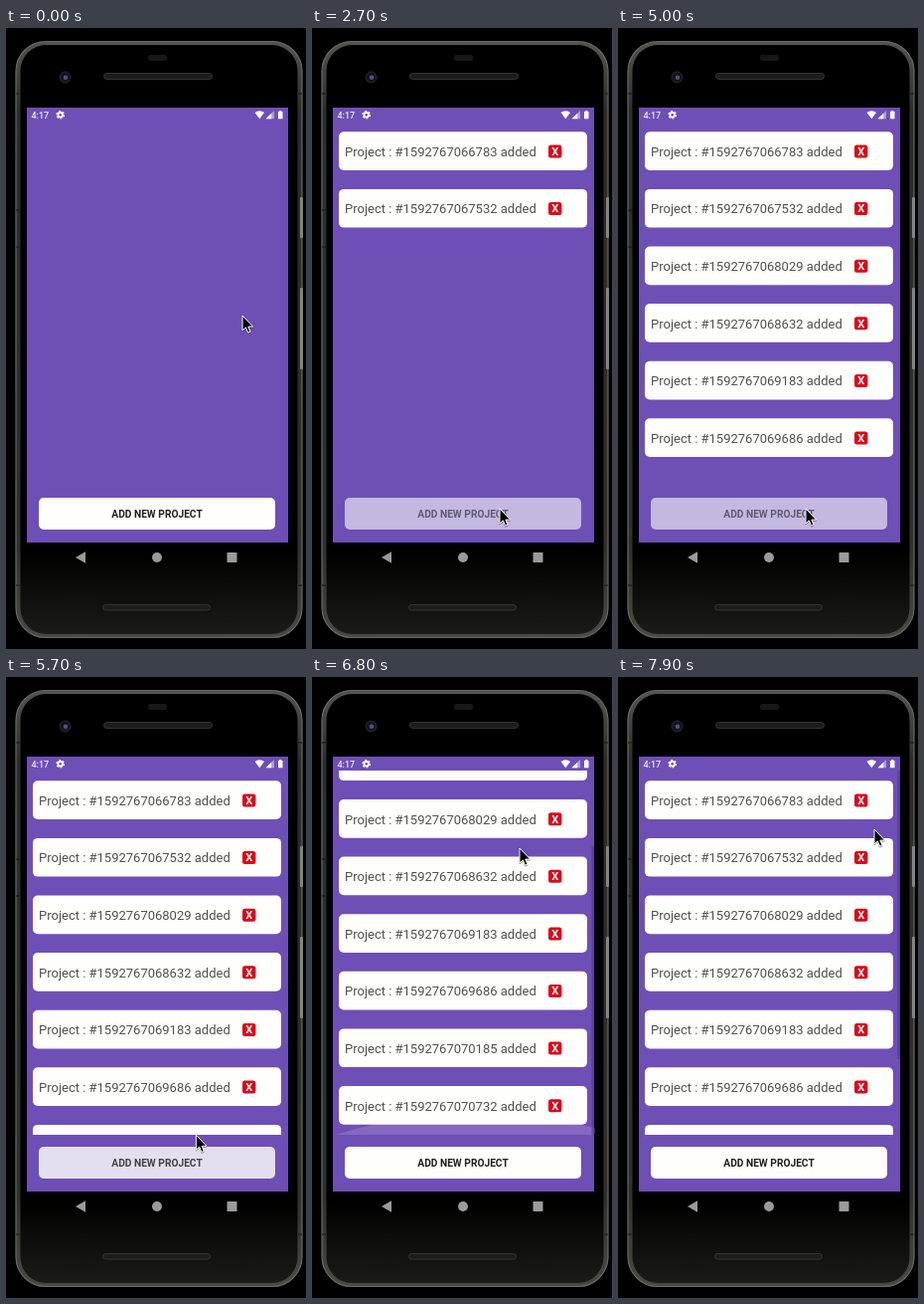
Write an HTML page that moves like this. It is 302x624 px and loops after 8000 ms.

```html
<!DOCTYPE html>
<html lang="en">
<head>
<meta charset="utf-8">
<title>Project list</title>
<style>
  html, body { margin: 0; width: 100%; height: 100%; overflow: hidden; background: #000; }
  svg { display: block; font-family: Roboto, sans-serif; }
  #cursor { filter: drop-shadow(.5px 1px .7px #0006); }
</style>
</head>
<body>
<svg width="302" height="624" viewBox="0 0 302 624">
  <defs>
    <linearGradient id="metal" x2="0" y2="1">
      <stop offset="0" stop-color="#54544f"/>
      <stop offset=".12" stop-color="#2c2c2a"/>
      <stop offset=".85" stop-color="#30302d"/>
      <stop offset="1" stop-color="#4a4a44"/>
    </linearGradient>
    <linearGradient id="glass" x2="0" y2="1">
      <stop offset=".86" stop-color="#000"/>
      <stop offset="1" stop-color="#1b1b17"/>
    </linearGradient>
    <clipPath id="view"><rect x="21" y="94" width="264" height="366"/></clipPath>
  </defs>

  <!-- Phone body -->
  <rect x="10" y="13.5" width="288" height="599" rx="30" fill="url(#metal)" stroke="#696964" stroke-width="1.2"/>
  <rect x="14.5" y="17" width="279" height="592" rx="26" fill="url(#glass)"/>
  <path d="M10 66h4M10 183h4M10 220h4M294 66h4M10 560h4M294 560h4" stroke="#161616"/>
  <g fill="#858580">
    <rect x="296" y="170" width="3" height="41" rx="1"/>
    <rect x="296" y="261" width="3" height="82" rx="1"/>
  </g>
  <rect x="143" y="27" width="19" height="6" rx="2" fill="#171717"/>
  <g fill="#1c1c1c" stroke="#343434">
    <rect x="98.5" y="45.5" width="109" height="6" rx="3"/>
    <rect x="97.5" y="579.5" width="108" height="5.5" rx="2.7"/>
  </g>
  <circle cx="59.5" cy="49.5" r="5.5" fill="#14151b" stroke="#2a2a2e"/>
  <circle cx="60" cy="49.7" r="2.2" fill="#4c5290"/>

  <!-- Screen -->
  <rect x="21" y="80" width="263" height="437" fill="#6e4fb6"/>
  <g fill="#fff">
    <text x="25.5" y="90.7" font-size="9" font-weight="500" fill="#eee9f8">4:17</text>
    <g fill="none" stroke="#fff">
      <circle cx="54.7" cy="87.3" r="2.3" stroke-width="1.8"/>
      <circle cx="54.7" cy="87.3" r="3.7" stroke-width="1.2" stroke-dasharray="1.95 1.925"/>
    </g>
    <path d="M250.5 85Q255.3 81.5 260 85L255.3 91.2Z"/>
    <path d="M261.5 91.2L270 83V91.2Z" opacity=".45"/>
    <path d="M261.5 91.2L267.2 85.7V91.2Z"/>
    <path d="M274 84h1.2v-1h2.1v1h1.2v7.3h-4.5z"/>
  </g>

  <g clip-path="url(#view)">
    <g id="list"></g>
    <path id="glowTop" d="M4 94Q152 134 300 94Z" fill="#fff"/>
    <path id="glowBottom" d="M24 460Q166 415 308 460Z" fill="#fff"/>
    <rect id="bar" x="281.5" width="2.5" height="290" fill="#3d2a80" opacity=".45"/>
  </g>

  <rect class="button" x="33" y="472" width="238" height="32" rx="5" fill="#fefefc"/>
  <text class="button" x="152" y="491.9" font-size="10.2" font-weight="700" text-anchor="middle" fill="#202020">ADD NEW PROJECT</text>

  <g fill="#9a9a9a">
    <path d="M70 532L80 526.3V537.7Z"/>
    <circle cx="152" cy="532" r="5"/>
    <rect x="222.5" y="527" width="10" height="10" rx=".5"/>
  </g>

  <path id="cursor" d="M0 0V15L3.4 11.9L5.6 17.2L8 16.2L5.8 11.1H10.6Z" fill="#000" stroke="#fff" stroke-linejoin="round"/>
</svg>

<script>
const $ = id => document.getElementById(id);
const DURATION = 8000, TICK = 100, PITCH = 57.6;
const VIEW_TOP = 94, VIEW_HEIGHT = 366, MAX_SCROLL = 96.5;
const DRAG_UP = 5600, DRAG_DOWN = 6950, RELEASE = 7400;

// The project ids are timestamps, so they also tell when each row appears.
const ids = [66783, 67532, 68029, 68632, 69183, 69686, 70185, 70732];
const taps = ids.map((id, i) => {
  const added = 1640 + id - ids[0];
  return { added, pressed: added - Math.max(90, 339 - 50 * i) };
});

// Pointer waypoints: time, x, y.
const path = [[400, 238, 289], [1100, 189, 483], [DRAG_UP, 189, 483], [6200, 203, 346],
  [6800, 209, 172], [DRAG_DOWN, 209, 172], [RELEASE, 222, 300], [7800, 258, 153]];

$('list').innerHTML = ids.map((id, i) => `
  <g transform="translate(0 ${104.3 + i * PITCH})">
    <rect x="27" width="250" height="38.7" rx="5" fill="#fefefc"/>
    <text x="33" y="24.5" font-size="13" fill="#505050">Project : #15927670${id} added</text>
    <rect x="238" y="13.2" width="13.4" height="13" rx="2.5" fill="#dc0718"/>
    <text x="244.7" y="23.6" font-size="11" font-weight="700" text-anchor="middle" fill="#fff">X</text>
  </g>`).join('');
const rows = [...$('list').children];
const buttonParts = document.querySelectorAll('.button');

const clamp = (v, lo, hi) => Math.min(hi, Math.max(lo, v));

function pointer(t) {
  const i = clamp(path.findLastIndex(p => p[0] <= t), 0, path.length - 2);
  const [t0, x0, y0] = path[i], [t1, x1, y1] = path[i + 1];
  const p = clamp((t - t0) / (t1 - t0), 0, 1);
  return [x0 + (x1 - x0) * p, y0 + (y1 - y0) * p];
}

// Unclamped list offset: the list follows the pointer while it drags.
function dragOffset(t, y) {
  if (t < DRAG_UP || t > RELEASE) return 0;
  return t < DRAG_DOWN ? Math.max(0, 398.4 - y) : MAX_SCROLL + 172 - y;
}

function buttonOpacity(t) {
  const tap = taps.findLast(tap => tap.pressed <= t);
  return tap ? clamp(.6 + .4 * (t - tap.added) / 200, .6, 1) : 1;
}

const glow = overscroll => .15 * clamp(overscroll / 60, 0, 1);

function draw(now) {
  const t = Math.floor(now % DURATION / TICK) * TICK;
  const [x, y] = pointer(t);
  const offset = dragOffset(t, y), scroll = clamp(offset, 0, MAX_SCROLL);
  const show = (el, on) => el.setAttribute('visibility', on ? 'visible' : 'hidden');

  rows.forEach((row, i) => show(row, t >= taps[i].added));
  buttonParts.forEach(el => el.setAttribute('opacity', buttonOpacity(t)));
  $('list').setAttribute('transform', `translate(0 ${-scroll})`);
  $('bar').setAttribute('y', VIEW_TOP + scroll * VIEW_HEIGHT / (VIEW_HEIGHT + MAX_SCROLL));
  show($('bar'), t >= 6000);
  $('glowTop').setAttribute('opacity', glow(-offset));
  $('glowBottom').setAttribute('opacity', glow(offset - MAX_SCROLL));
  $('cursor').setAttribute('transform', `translate(${x} ${y})`);
}

const start = performance.now();
function loop() {
  draw(performance.now() - start);
  requestAnimationFrame(loop);
}
loop();
</script>
</body>
</html>
```
